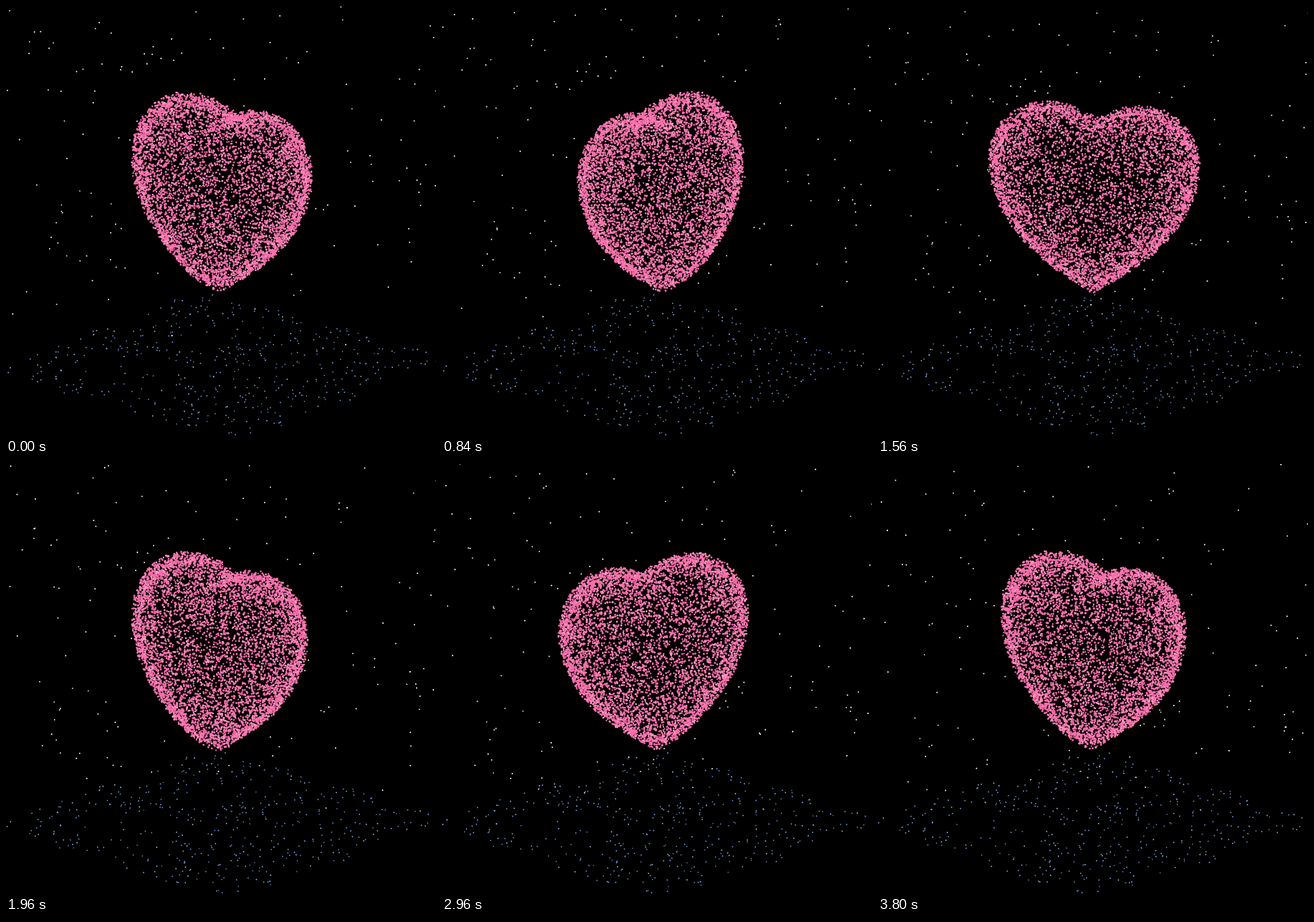
Animation of 600x600 px, one loop 3840 ms. Source, as an HTML page with a canvas:

```html
<!DOCTYPE html>
<html lang="en">
<head>
<meta charset="utf-8">
<title>Particle heart</title>
<style>
  html, body { margin: 0; width: 100%; height: 100%; overflow: hidden; background: #000; }
  canvas { display: block; width: 600px; height: 600px; }
</style>
</head>
<body>
<canvas id="stage" width="600" height="600"></canvas>
<script>
const ctx = document.getElementById('stage').getContext('2d');
const LOOP = 3840, STEP = 40, TAU = Math.PI * 2;

let seed = 20771;
function rnd() {
  seed = (seed + 0x6D2B79F5) | 0;
  let t = Math.imul(seed ^ (seed >>> 15), 1 | seed);
  t = (t + Math.imul(t ^ (t >>> 7), 61 | t)) ^ t;
  return ((t ^ (t >>> 14)) >>> 0) / 4294967296;
}
const span = (a, b) => a + (b - a) * rnd();
const pick = list => list[Math.floor(rnd() * list.length)];

// Implicit heart surface, negative inside
function heartField(x, y, z) {
  const a = x * x + 2.25 * y * y + z * z - 1;
  const z3 = z * z * z;
  return a * a * a - x * x * z3 - 0.1125 * y * y * z3;
}

function surfaceRadius(x, y, z) {
  let lo = 0, hi = 1.7;
  for (let i = 0; i < 18; i++) {
    const r = (lo + hi) / 2;
    if (heartField(x * r, y * r, z * r) < 0) lo = r; else hi = r;
  }
  return lo;
}

const PINKS = ['#ff69b4', '#fb6cab', '#ff86b9', '#ee639f', '#ff9cc3', '#f574ab'];
const BLUES = ['#7aa8f5', '#6a94e0', '#8fb0e0', '#9aa8c0', '#6288cc'];
const WHITES = ['#fff', '#fff', '#e8e8e8'];

function makeHeart(count) {
  const dots = [];
  while (dots.length < count) {
    const z = span(-1, 1), a = span(0, TAU), s = Math.sqrt(1 - z * z);
    const x = s * Math.cos(a), y = s * Math.sin(a);
    const r = surfaceRadius(x, y, z);
    if (rnd() > Math.pow(r / 1.36, 3.2) * (1 - 0.25 * z)) continue;
    const k = r * span(0.93, 1.02);
    dots.push({
      x: x * k * 129 - 2.5,
      y: y * k * 138 + 4.3,
      h: z * k * 117,
      r: span(1.05, 1.6),
      color: pick(PINKS)
    });
  }
  return dots;
}

// Square with its corners rounded off, thinner in one patch
function makeFloor(count) {
  const dots = [];
  while (dots.length < count) {
    const x = span(-236, 236), y = span(-236, 236);
    if (Math.hypot(x, y) > 312) continue;
    if (Math.hypot(x + 75, y + 115) < 75 && rnd() < 0.75) continue;
    dots.push({ x, y, h: span(-3, 3), r: span(0.75, 1), color: pick(BLUES) });
  }
  return dots;
}

function makeSnow(count) {
  return Array.from({ length: count }, () => ({
    x: span(-315, 315), y: span(-170, 170), h: span(0, 480),
    r: span(0.9, 1.05), color: pick(WHITES)
  }));
}

const heart = makeHeart(6900);
const ground = makeFloor(450);
const snow = makeSnow(190);

// Spin about the vertical axis, then tilt towards the viewer
function drawDots(dots, angle, baseY, tilt, height) {
  const c = Math.cos(angle), s = Math.sin(angle);
  const paths = {};
  for (const p of dots) {
    const x = 300 + p.x * c + p.y * s;
    const y = baseY - height(p) - (p.y * c - p.x * s) * tilt;
    const path = paths[p.color] || (paths[p.color] = new Path2D());
    path.moveTo(x + p.r, y);
    path.arc(x, y, p.r, 0, TAU);
  }
  for (const color in paths) {
    ctx.fillStyle = color;
    ctx.fill(paths[color]);
  }
}

const still = p => p.h;

function draw(ms) {
  const t = ms / 1000;
  const drift = 0.03 * t - 0.08;
  ctx.fillStyle = '#000';
  ctx.fillRect(0, 0, 600, 600);
  drawDots(ground, Math.PI / 4 + drift, 501, 0.32, still);
  drawDots(snow, drift, 501, 0.32, p => 75 + (p.h - 30 * t + 480) % 480);
  drawDots(heart, Math.PI / 4 + TAU * ms / LOOP, 284, 0.265, still);
}

function tick() {
  draw(Math.floor((performance.now() % LOOP) / STEP) * STEP);
  requestAnimationFrame(tick);
}
tick();
</script>
</body>
</html>
```
